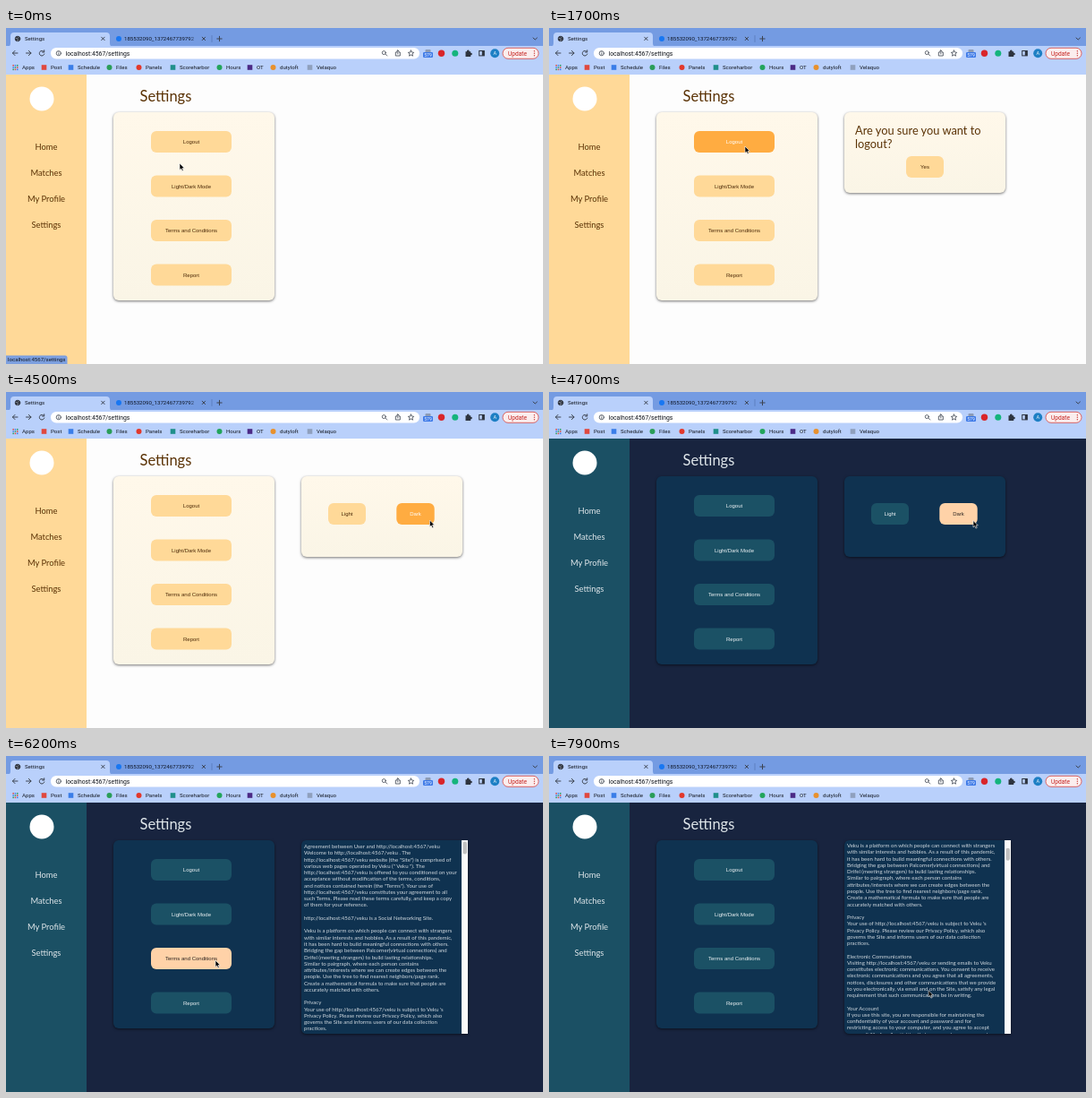
Write an HTML page that moves like this. It is 600 by 375 pixels and loops after 8 s.

```html
<!DOCTYPE html>
<html lang="en">
<head>
<meta charset="utf-8">
<title>Settings</title>
<style>
  html, body { margin: 0; width: 100%; height: 100%; overflow: hidden; }
  svg { display: block; width: 600px; height: 375px; }
  #stage {
    --page: #fdfdfd; --side: #ffd998; --ink: #5a3205; --label: #4a2a08;
    --card1: #fff8ea; --card2: #faf5e6; --btn: #ffd998;
    --hot: #ffac41; --hot-label: #fff;
  }
  #stage.dark {
    --page: #18243f; --side: #1b5064; --ink: #dfe6ea; --label: #eef3f5;
    --card1: #0f3250; --card2: #0f3250; --btn: #1b5165;
    --hot: #ffd2a8; --hot-label: #2b2420;
  }
  .page { fill: var(--page); }
  .side { fill: var(--side); }
  .card { fill: url(#cardFill); filter: drop-shadow(0 1.5px 1.5px rgba(0, 0, 0, .55)); }
  .ink { font-family: Lato, sans-serif; fill: var(--ink); }
  .nav { font-size: 9.4px; text-anchor: middle; }
  .btn rect { fill: var(--btn); }
  .btn text { font: 6px "Liberation Sans", Arial, sans-serif; fill: var(--label); text-anchor: middle; }
  .btn.hot rect { fill: var(--hot); }
  .btn.hot text { fill: var(--hot-label); }
  .terms { font-size: 6.05px; white-space: pre; fill-opacity: .92; }
  .ui { font: 6.1px Roboto, sans-serif; fill: #12161e; }
  .icon { fill: none; stroke: #3c4350; stroke-width: 1; stroke-linecap: round; stroke-linejoin: round; }
  .hide { display: none; }
</style>
</head>
<body>
<svg id="stage" viewBox="0 0 600 375">
  <defs>
    <linearGradient id="cardFill" x1="0" y1="0" x2="0" y2="1">
      <stop offset="0" style="stop-color: var(--card1)"/>
      <stop offset="1" style="stop-color: var(--card2)"/>
    </linearGradient>
    <linearGradient id="tabFade" gradientUnits="userSpaceOnUse" x1="205" y1="0" x2="215" y2="0">
      <stop offset="0" stop-color="#0c1424"/>
      <stop offset="1" stop-color="#0c1424" stop-opacity="0"/>
    </linearGradient>
    <clipPath id="termsClip"><rect x="330" y="94" width="179" height="216"/></clipPath>
  </defs>

  <!-- page -->
  <rect class="page" width="600" height="375"/>
  <rect class="side" y="52" width="90" height="323"/>
  <circle cx="40" cy="79" r="13.5" fill="#fff"/>
  <g id="nav" class="ink nav"></g>
  <text class="ink" x="149.5" y="81.6" font-size="16.5">Settings</text>
  <rect class="card" x="120" y="94" width="180" height="210" rx="6"/>
  <g id="menu"></g>

  <g id="logout">
    <rect class="card" x="330" y="94" width="180" height="90" rx="6"/>
    <text class="ink" font-size="12.8"><tspan x="342" y="119">Are you sure you want to</tspan><tspan x="342" y="134">logout?</tspan></text>
  </g>
  <g id="theme">
    <rect class="card" x="330" y="94" width="180" height="90" rx="6"/>
  </g>
  <g id="terms">
    <path class="card" d="M336 94H516V310H336Q330 310 330 304V100Q330 94 336 94Z"/>
    <g clip-path="url(#termsClip)"><text id="lines" class="ink terms"></text></g>
    <rect x="509" y="94" width="7" height="216" fill="#fafafa"/>
    <rect id="thumb" x="510.5" y="95.5" width="4.5" height="14" rx="2.2" fill="#c1c1c1"/>
  </g>

  <!-- browser -->
  <rect width="600" height="20.5" fill="#749be2"/>
  <path d="M2 20.5Q5 20.5 5 17V9Q5 5 9 5H112Q116 5 116 9V17Q116 20.5 119 20.5Z" fill="#b9d0fb"/>
  <rect y="20" width="600" height="32" fill="#b9d0fb"/>
  <g class="icon">
    <circle cx="13" cy="12" r="2.8" fill="#20242c"/>
    <path d="M11.2 11.2l1.5 1 1-1.6M12.5 14l1.5-1" stroke="#dbe6fb" stroke-width=".6"/>
    <path d="M106.7 10.2l3.4 3.4m0-3.4l-3.4 3.4M219.2 10.2l3.4 3.4m0-3.4l-3.4 3.4M235.8 12h5.4M238.5 9.3v5.4M589 11l2.2 2 2.2-2"/>
    <path d="M230 8.5v7" stroke="#4f70ae" stroke-width=".6"/>
    <path d="M13 28H7.5M10 25.4L7.4 28l2.6 2.6M22.5 28H28M25.4 25.4L28 28l-2.6 2.6"/>
    <path d="M42.3 26.5A2.8 2.8 0 1 0 42.8 29M42.7 24.8v2.2h-2.2"/>
  </g>
  <circle cx="126" cy="12" r="3" fill="#1877f2"/>
  <rect x="50" y="22" width="412" height="12.5" rx="6.2" fill="#fff"/>
  <g class="icon" style="stroke-width:.8">
    <circle cx="58.8" cy="28.2" r="2.6"/><path d="M58.8 28v1.5M58.8 26.7v.1"/>
    <circle cx="422.3" cy="27.6" r="2"/><path d="M424 29.2l1.8 1.8"/>
    <path d="M436.5 27h-1.2v4h5v-4h-1.2M437.8 29v-4M436.4 26.2l1.4-1.4 1.4 1.4"/>
    <path d="M452.5 25l1 2.1 2.2.2-1.7 1.6.5 2.3-2-1.2-2 1.2.5-2.3-1.7-1.6 2.2-.2z"/>
  </g>
  <rect x="468.5" y="24" width="6" height="4" rx="1" fill="#8c9bb5"/>
  <rect x="466" y="27" width="11" height="6" rx="1.2" fill="#3b78e7"/>
  <text class="ui" x="471.5" y="31.9" text-anchor="middle" style="font-size:5px;fill:#fff">579</text>
  <circle cx="486.5" cy="28.2" r="3.7" fill="#d9252a"/>
  <circle cx="501.8" cy="28.2" r="3.5" fill="#15b47c"/>
  <path d="M513.5 26.3h1.6a1.3 1.3 0 1 1 2.4 0h1.7v1.6a1.2 1.2 0 1 1 0 2.3v1.7h-5.7z" fill="#2d333e"/>
  <rect x="528.7" y="25.5" width="5.6" height="5.4" fill="none" stroke="#2d333e"/>
  <path d="M531.8 25.5h2.5v5.4h-2.5z" fill="#2d333e"/>
  <circle cx="546.2" cy="28.2" r="5" fill="#1d7fc4"/>
  <text class="ui" x="546.2" y="30.2" text-anchor="middle" style="font-size:5.5px;fill:#fff">A</text>
  <rect x="555" y="22.3" width="40" height="12" rx="6" fill="#fbeeee" stroke="#d93025" stroke-width=".7"/>
  <text class="ui" x="561" y="30.5" style="font-size:6.6px;fill:#c5221f">Update</text>
  <path d="M590.3 25.7v.1M590.3 28.2v.1M590.3 30.7v.1" stroke="#c5221f" stroke-width="1.2" stroke-linecap="round"/>
  <text class="ui" x="21" y="14.1">Settings</text>
  <text class="ui" x="132" y="14.1" style="fill:url(#tabFade)">185532090_1372467739792</text>
  <text class="ui" x="66.5" y="30.5" style="font-size:6.8px">localhost:4567/settings</text>
  <g id="marks" class="ui"></g>

  <g id="status">
    <path d="M0 365.5H66Q68.5 365.5 68.5 368V375H0Z" fill="#7c9fdf"/>
    <text class="ui" x="2" y="372.3">localhost:4567/settings</text>
  </g>
  <path id="cursor" d="M0 0V7.4L1.7 5.9 2.9 8.6 4.2 8 3 5.4H5.3Z" fill="#000" stroke="#fff" stroke-width=".6"/>
</svg>

<script>
const $ = id => document.getElementById(id);
const make = (parent, tag, attrs, text = "") => {
  const el = document.createElementNS("http://www.w3.org/2000/svg", tag);
  for (const k in attrs) el.setAttribute(k, attrs[k]);
  el.textContent = text;
  return parent.appendChild(el);
};

["Home", "Matches", "My Profile", "Settings"].forEach((s, i) =>
  make($("nav"), "text", { x: 45, y: 135.7 + 29 * i }, s));

const buttons = [];
function button(parent, label, x, y, w) {
  const el = make($(parent), "g", { class: "btn" });
  make(el, "rect", { x, y, width: w, height: 24, rx: 6 });
  make(el, "text", { x: x + w / 2, y: y + 14.1 }, label);
  buttons.push({ el, parent, x, y, w });
}
["Logout", "Light/Dark Mode", "Terms and Conditions", "Report"].forEach((s, i) =>
  button("menu", s, 162, 115 + 49.5 * i, 90));
button("logout", "Yes", 399, 143, 42);
button("theme", "Light", 360, 124, 42);
button("theme", "Dark", 436.3, 124, 42.4);

// Bookmarks: label, text x, icon colour, icon is round
[["Post", 50, "#e0483e"], ["Schedule", 80, "#3a7de8"], ["Files", 123, "#2a9d58", 1],
 ["Panels", 156, "#e2382b", 1], ["Scoreharbor", 194, "#1f8f8a"], ["Hours", 246, "#23a45b", 1],
 ["OT", 280, "#4b2a86"], ["dutyloft", 306, "#e8912d", 1], ["Velaquo", 347, "#8fa0bd"]
].forEach(([label, x, fill, round]) => {
  if (round) make($("marks"), "circle", { cx: x - 7.5, cy: 44, r: 3, fill });
  else make($("marks"), "rect", { x: x - 10.3, y: 41.2, width: 5.6, height: 5.6, fill });
  make($("marks"), "text", { x, y: 46.1 }, label);
});
const dots = ["#e0483e", "#3a7de8", "#2a9d58"];
for (let i = 0; i < 9; i++) {
  const row = Math.floor(i / 3);
  make($("marks"), "rect", { x: 7.4 + i % 3 * 2.3, y: 41 + row * 2.3, width: 1.5, height: 1.5, fill: dots[(i + row) % 3] });
}
make($("marks"), "text", { x: 18, y: 46.1 }, "Apps");

`Agreement between User and http://localhost:4567/veku
Welcome to http://localhost:4567/veku . The
http://localhost:4567/veku website (the "Site") is comprised of
various web pages operated by Veku (" Veku "). The
http://localhost:4567/veku is offered to you conditioned on your
acceptance without modification of the terms, conditions,
and notices contained herein (the "Terms"). Your use of
http://localhost:4567/veku constitutes your agreement to all
such Terms. Please read these terms carefully, and keep a copy
of them for your reference.

http://localhost:4567/veku is a Social Networking Site.

Veku is a platform on which people can connect with strangers
with similar interests and hobbies. As a result of this pandemic,
it has been hard to build meaningful connections with others.
Bridging the gap between Palcorner(virtual connections) and
Drifel (meeting strangers) to build lasting relationships.
Similar to pairgraph, where each person contains
attributes/interests where we can create edges between the
people. Use the tree to find nearest neighbors/page rank.
Create a mathematical formula to make sure that people are
accurately matched with others.

Privacy
Your use of http://localhost:4567/veku is subject to Veku 's
Privacy Policy. Please review our Privacy Policy, which also
governs the Site and informs users of our data collection
practices.

Electronic Communications
Visiting http://localhost:4567/veku or sending emails to Veku
constitutes electronic communications. You consent to receive
electronic communications and you agree that all agreements,
notices, disclosures and other communications that we provide
to you electronically, via email and on the Site, satisfy any legal
requirement that such communications be in writing.

Your Account
If you use this site, you are responsible for maintaining the
confidentiality of your account and password and for
restricting access to your computer, and you agree to accept
responsibility for all activities that occur under your account or`
  .split("\n").forEach((s, i) => make($("lines"), "tspan", { x: 333, y: 103.1 + 7.26 * i }, s));

// Rows of [time, ...values], eased between neighbours
const path = [
  [0, 194, 151], [200, 195, 150], [900, 215, 131], [1300, 219, 132], [1800, 219, 132],
  [2400, 228, 176], [2800, 232, 176], [3300, 253, 168], [3600, 262, 166],
  [4300, 472, 142], [4600, 474, 143.5], [4900, 474, 143.5], [5700, 234, 228],
  [6500, 234, 228], [7200, 424, 261.5], [8000, 424, 261.5]
];
const scroll = [[0, 0], [7500, 0], [7600, 7], [7900, 95.3], [8000, 110]];
function at(rows, t, ease = u => u) {
  const i = rows.findIndex(r => r[0] > t);
  const a = rows[i - 1], b = rows[i];
  const u = ease((t - a[0]) / (b[0] - a[0]));
  return a.slice(1).map((v, k) => v + (b[k + 1] - v) * u);
}
const smooth = u => u * u * (3 - 2 * u);
const show = (id, on) => $(id).classList.toggle("hide", !on);

function draw(now) {
  const t = Math.floor(now % 8000 / 100) * 100;
  const [x, y] = at(path, t, smooth);
  const [top] = at(scroll, t);
  const panel = t < 1300 ? "" : t < 2600 ? "logout" : t < 6000 ? "theme" : "terms";

  $("stage").classList.toggle("dark", t >= 4600);
  for (const id of ["logout", "theme", "terms"]) show(id, id === panel);
  for (const b of buttons) {
    const live = b.parent === "menu" || b.parent === panel;
    const over = x >= b.x && x <= b.x + b.w + 1.5 && y >= b.y && y <= b.y + 24;
    b.el.classList.toggle("hot", live && over);
  }
  show("status", t < 400);
  $("lines").setAttribute("transform", `translate(0 ${-top})`);
  $("thumb").setAttribute("y", 95.5 + top * .075);
  $("cursor").setAttribute("transform", `translate(${x} ${y})`);
  requestAnimationFrame(draw);
}
draw(performance.now());
</script>
</body>
</html>
```
